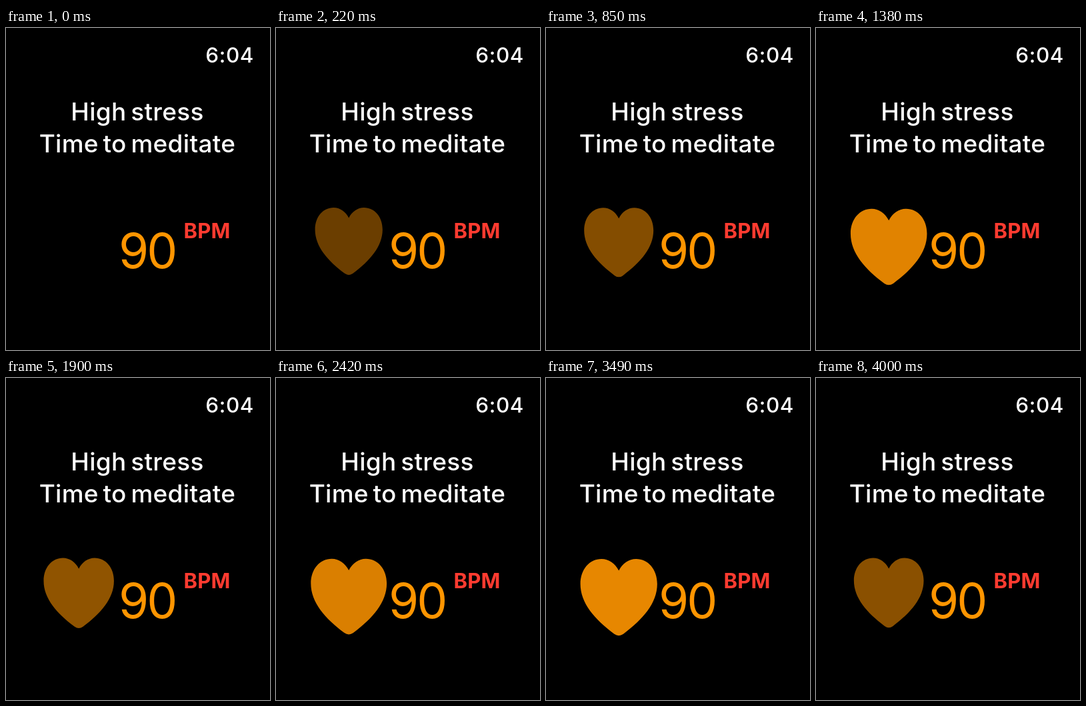
Animation of 396 by 484 pixels, one loop 4080 ms. Source, as an HTML page:

```html
<!DOCTYPE html>
<html lang="en">
<head>
<meta charset="utf-8">
<title>Heart rate</title>
<style>
  html, body { margin: 0; width: 100%; height: 100%; overflow: hidden; background: #000; }
  svg { display: block; width: 100%; height: 100%; font-family: Inter, Roboto, sans-serif; }
  .message { font-size: 37px; font-weight: 450; letter-spacing: 0.3px; word-spacing: -3.5px; text-anchor: middle; }
</style>
</head>
<body>
<svg viewBox="0 0 396 484">
  <path id="heart" fill="#ff9500" d="M0 18C-5.500 7 -15.500 0 -26.500 0C-45 0 -59 16 -59 38.500C-59 68 -37 93 -7 115.500Q0 120.500 7 115.500C37 93 59 68 59 38.500C59 16 45 0 26.500 0C15.500 0 5.500 7 0 18Z"/>
  <text x="299.300" y="52" font-size="31.5" font-weight="550" letter-spacing="0.6" fill="#fff">6:04</text>
  <g class="message" fill="#fff">
    <text x="197" y="139">High stress</text>
    <text x="197" y="187">Time to meditate</text>
  </g>
  <text x="169" y="360.500" font-size="73" letter-spacing="-3" fill="#ff9500">90</text>
  <text x="266.500" y="316" font-size="31" font-weight="750" letter-spacing="0.2" fill="#ff3b30">BPM</text>
</svg>
<script>
  const LOOP = 4080, EASE = 300, DIM = 0.42;
  // Each beat is [start, end]; beats alternate between brightening and dimming.
  const beats = [[110, 340], [630, 850], [1170, 1380], [1700, 1900],
                 [2220, 2420], [2740, 2960], [3270, 3490], [3790, 4000]];
  const heart = document.getElementById('heart');

  function glow(t) {
    const i = beats.findLastIndex(([start]) => t >= start);
    if (i < 0) return 0;
    const [start, end] = beats[i];
    const step = (end - start) / 2;
    // The pulse moves in two steps, then holds until the next beat.
    const age = Math.min(2, Math.floor((t - start) / step)) * step;
    const p = (1 - Math.cos(Math.PI * age / EASE)) / 2;
    return DIM + (1 - DIM) * (i % 2 ? 1 - p : p);
  }

  function draw(now) {
    const g = glow(now % LOOP);
    const scale = 1 - 0.245 * (1 - g);
    const top = 272.3 - 4 * (1 - g);
    heart.setAttribute('opacity', g);
    heart.setAttribute('transform', `translate(109.2 ${top}) scale(${scale})`);
  }

  const begin = performance.now();
  function frame() {
    draw(performance.now() - begin);
    requestAnimationFrame(frame);
  }
  frame();
</script>
</body>
</html>
```
